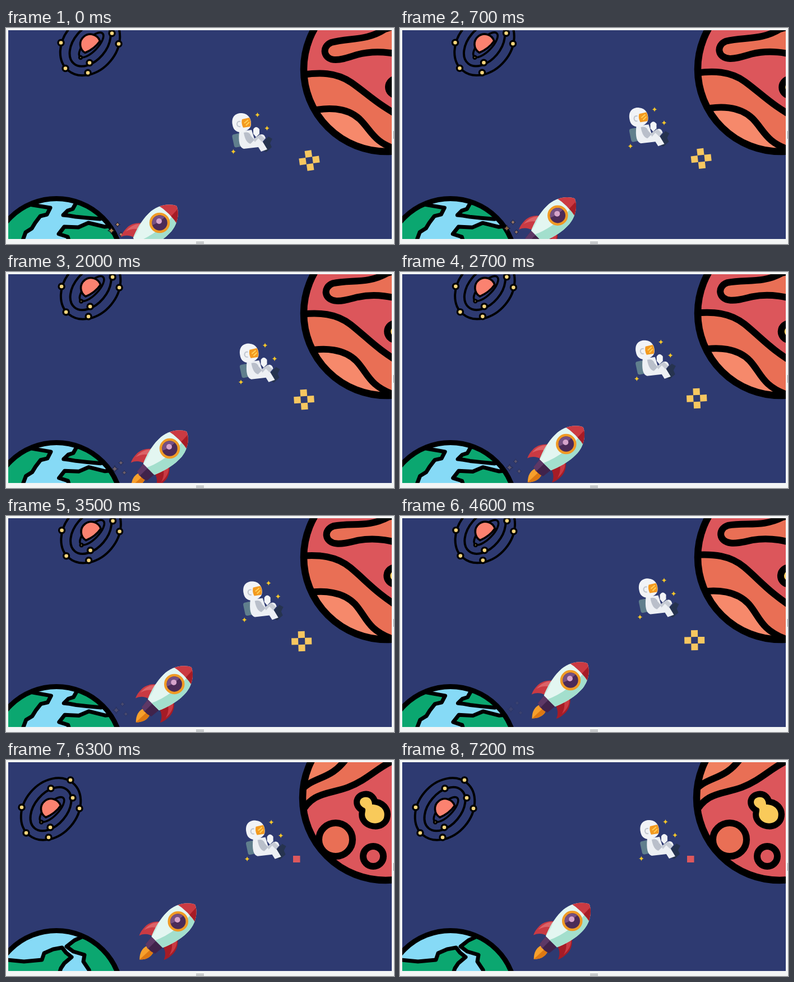
Animation of 692 by 388 pixels, one loop 7.3 s. Source, as an HTML page:

```html
<!DOCTYPE html>
<html lang="en">
<head>
<meta charset="utf-8">
<title>Space scene</title>
<style>
  html, body { margin: 0; width: 100%; height: 100%; overflow: hidden; background: #f3f5f5; }
  svg { display: block; width: 692px; height: 388px; }
  .ink { stroke: #000; stroke-linejoin: round; stroke-linecap: round; }
  .line { fill: none; }
</style>
</head>
<body>
<svg viewBox="0 0 692 388">
  <defs>
    <clipPath id="stage"><rect x="4" y="4" width="684" height="375"/></clipPath>
    <clipPath id="marsDisc"><circle cx="679" cy="74" r="149"/></clipPath>
    <clipPath id="earthDisc"><circle cx="90" cy="423" r="117"/></clipPath>
    <clipPath id="hull"><path d="M0-43C15-36 26-18 26 2C26 20 20 40 14 53H-14C-20 40-26 20-26 2C-26-18-15-36 0-43Z"/></clipPath>
    <path id="spark" d="M0-4.5Q.8-.8 4.5 0Q.8.8 0 4.5Q-.8.8-4.5 0Q-.8-.8 0-4.5Z"/>
    <path id="crater" d="M641 73C650 71 655 78 655 86C670 86 680 96 676 110C671 123 649 123 643 109C640 101 646 95 641 92C630 87 631 75 641 73Z" fill="#f9ca5a"/>
  </defs>

  <g clip-path="url(#stage)">
    <rect x="4" y="4" width="684" height="375" fill="#2e3a71"/>

    <g id="solar">
      <g class="ink line" stroke-width="4" transform="rotate(-50)">
        <ellipse rx="61" ry="47"/>
        <ellipse rx="45" ry="29"/>
      </g>
      <g class="ink" stroke-width="3.6">
        <ellipse rx="29" ry="11.5" fill="#2e3a71" transform="translate(2 1) rotate(-46)"/>
        <path d="M-9 15A18 18 0 1 1 17.500-6Q8 8-9 15Z" fill="#fb8270"/>
      </g>
      <g id="moons" class="ink" fill="#fbd67c" stroke-width="3.4"></g>
    </g>

    <g id="mars">
      <circle cx="679" cy="74" r="148" fill="#dc565b"/>
      <g clip-path="url(#marsDisc)">
        <g id="marsA" class="ink" stroke-width="12">
          <path d="M518 86C560 78 590 80 616 98C650 122 662 138 720 168V260H500Z" fill="#e96f55"/>
          <path d="M533 152C573 140 608 143 630 163C652 184 655 206 700 219V260H500Z" fill="#f6896b"/>
          <path d="M588 57C566 57 562 34 580 26C612 17 642 24 676 2L720-12V54C690 42 655 40 626 48C610 53 600 57 588 57Z" fill="#e96f55"/>
          <circle cx="697" cy="106" r="15" fill="#f9ca5a"/>
        </g>
        <g id="marsB" class="ink" stroke-width="12">
          <path d="M527 104C548 62 578 68 612 55C650 40 665 18 700 4V-90H500Z" fill="#e96f55"/>
          <path d="M525 64C550 33 580 45 610 2V-90H500Z" fill="#f0805f"/>
          <circle cx="590" cy="149" r="30" fill="#e96f55"/>
          <circle cx="657" cy="179" r="18" fill="#dc565b"/>
          <use href="#crater" stroke-width="22"/>
          <use href="#crater" stroke="none"/>
        </g>
      </g>
      <circle class="ink line" cx="679" cy="74" r="148" stroke-width="12.500"/>
    </g>

    <g id="earth">
      <circle cx="90" cy="423" r="117" fill="#86daf6"/>
      <g clip-path="url(#earthDisc)" fill="#0ba770" class="ink" stroke-width="7">
        <g id="earthA">
          <path d="M-20 306L48 318L79 323L73 335L61 338L52 350L46 360L35 367L26 392H-30Z"/>
          <path d="M102 336L110 328L119 325L125 314L190 308L186 338L168 343L144 341L124 339L112 337Z"/>
          <path d="M94 370L104 357L129 358L147 350L176 357L220 352V400H118L110 375Z"/>
        </g>
        <g id="earthB">
          <path d="M-20 357L32 362L64 359L68 347L84 340L100 337L107 346L117 354L104 365L98 374L92 392H-20Z"/>
          <path d="M108 335L122 324L150 311L220 320V400H153L148 377L138 362L140 350L120 344Z"/>
        </g>
      </g>
      <circle class="ink line" cx="90" cy="423" r="116.5" stroke-width="9"/>
    </g>

    <g id="trail" fill="#d8a066" stroke="#17151f" stroke-width="1">
      <use href="#spark" transform="scale(1.4)"/>
      <use href="#spark" x="11" y="-11"/>
      <use href="#spark" x="18" y="7" transform="scale(.95)"/>
    </g>

    <g id="rocket">
      <g transform="rotate(45)">
        <path d="M0 97Q-13 84-8 70H8Q13 84 0 97Z" fill="#f7a02c"/>
        <path d="M0 97Q13 84 8 70H1Z" fill="#dd7812"/>
        <path d="M-19 21C-28 26-35 37-35 47C-35 55-34 61-31 67C-28 58-21 53-14 51Z" fill="#c93a43"/>
        <path d="M-22 25C-30 31-33 42-32 54C-30 45-24 38-19 35Z" fill="#dc6368"/>
        <path d="M19 21C28 26 35 37 35 47C35 55 34 61 31 67C28 58 21 53 14 51Z" fill="#a51c26"/>
        <path d="M22 25C30 31 33 42 32 54C30 45 24 38 19 35Z" fill="#c93a43"/>
        <path d="M-14 51H14L12 70Q0 75-12 70Z" fill="#40234b"/>
        <path d="M-14 51H-3V73Q-8 72-12 70Z" fill="#5d3866"/>
        <g clip-path="url(#hull)">
          <rect x="-30" y="-50" width="60" height="106" fill="#e3f6f1"/>
          <path d="M4-50H30V56H-6Q16 10 4-50Z" fill="#a3dfcd"/>
          <path d="M-30 14Q-14 36-14 56H-30Z" fill="#c4ebe0"/>
          <path d="M-30-50H30V-19Q0-27-30-19Z" fill="#cb3a42"/>
          <path d="M5-50H30V-19Q18-23 6-23Z" fill="#a51c26"/>
        </g>
      </g>
      <circle r="16" fill="#4b2b58" stroke="#f09a25" stroke-width="4.5"/>
      <path d="M-13 4A13.5 13.5 0 0 1 9-10Q-2 0-13 4Z" fill="#765083"/>
      <circle cx="-1" cy="-3" r="5" fill="#d6a4cb"/>
    </g>

    <g id="astronaut">
      <path d="M456 207L468 195L475 199L471 207L474 214L464 223L457 219Z" fill="#26334f"/>
      <rect x="405" y="190" width="15" height="24" rx="4" fill="#607f8d" transform="rotate(-12 412 202)"/>
      <path d="M416 186L438 183L443 199L455 191Q461 190 463 198L457 203L466 218L455 222L450 214L424 217Q413 214 416 186Z" fill="#edf0f4"/>
      <path d="M424 188Q434 185 437 194L443 201L436 208Q427 206 424 188Z" fill="#b9bfca"/>
      <path d="M441 200L453 191L462 199L457 205L450 198L444 205Z" fill="#c6cbd4"/>
      <path d="M441 190V182Q446 174 452 182V190L446 196Z" fill="#f3f5f7"/>
      <path d="M404 174C401 158 411 152 421 153C433 154 438 164 437 174C436 183 425 187 416 187C409 186 405 181 404 174Z" fill="#f1f3f6"/>
      <path d="M421 164L434 161Q438 168 436 177L423 179Q419 171 421 164Z" fill="#f39a20"/>
      <path d="M425 171L432 165M428 175L434 169" stroke="#ffd35a" stroke-width="2"/>
      <path d="M418 168Q412 167 412 173Q413 178 418 177" fill="none" stroke="#c0c6cf" stroke-width="2"/>
      <g fill="#f4c629">
        <use href="#spark" x="448.500" y="156"/>
        <use href="#spark" x="465.500" y="180"/>
        <use href="#spark" x="405.500" y="222"/>
      </g>
    </g>

    <path id="checker" fill="#f7c760" d="M-6-18h12v12h-12zM-6 6h12v12h-12zM-18-6h12v12h-12zM6-6h12v12h-12z"/>
    <rect id="block" x="512" y="172" width="12.500" height="12" fill="#dd585d"/>
  </g>

  <path d="M339 384.500h14M339 387h14" stroke="#8b8f92" stroke-width="1"/>
  <path d="M691.500 185v14" stroke="#9a9ea2" stroke-width="1"/>
</svg>

<script>
const LOOP = 7300, STEP = 100, CUT = 6000, SETTLE = 8000;
const $ = id => document.getElementById(id);
const move = (id, value) => $(id).setAttribute('transform', value);
const show = (id, on) => $(id).setAttribute('visibility', on ? 'visible' : 'hidden');
const at = (x, y, dx, dy, k) => `translate(${x + dx * k} ${y + dy * k})`;

// x, y, radius around the solar system's centre
const moons = [
  [35, -52, 5], [51, -1, 5], [-4, 51, 5], [-44, 43, 5], [-52, -3, 5],
  [0, -37, 5], [39, -20, 5], [-1, 33, 5], [-17, 23.5, 2.5]
];
$('moons').innerHTML = moons
  .map(([x, y, r]) => `<circle cx="${x}" cy="${y}" r="${r}"/>`).join('');

function draw(t) {
  const k = 1 - Math.pow(1 - t / SETTLE, 2.7);
  const last = t >= CUT;

  move('rocket', at(274, 350, 33.3, -61, k));
  move('astronaut', at(0, 0, 25, -45, k));
  move('checker', `${at(541, 238, -17.5, -16.5, k)} rotate(${-8 * (1 - k)})`);
  move('trail', at(188, 364, 11, -19, k));
  $('trail').setAttribute('opacity', 0.8 * (1 - k));

  move('solar', last ? 'translate(80 88)' : at(150, 29.5, 2, -1, k));
  move('mars', last ? 'translate(-2 -6)' : '');
  move('marsA', `rotate(${6 * k} 679 74)`);
  move('earthA', `rotate(${k} 90 423)`);

  for (const id of ['marsA', 'earthA', 'checker', 'trail']) show(id, !last);
  for (const id of ['marsB', 'earthB', 'block']) show(id, last);
}

const start = performance.now();
function tick() {
  const t = (performance.now() - start) % LOOP;
  draw(Math.floor(t / STEP) * STEP);
  requestAnimationFrame(tick);
}
tick();
</script>
</body>
</html>
```
